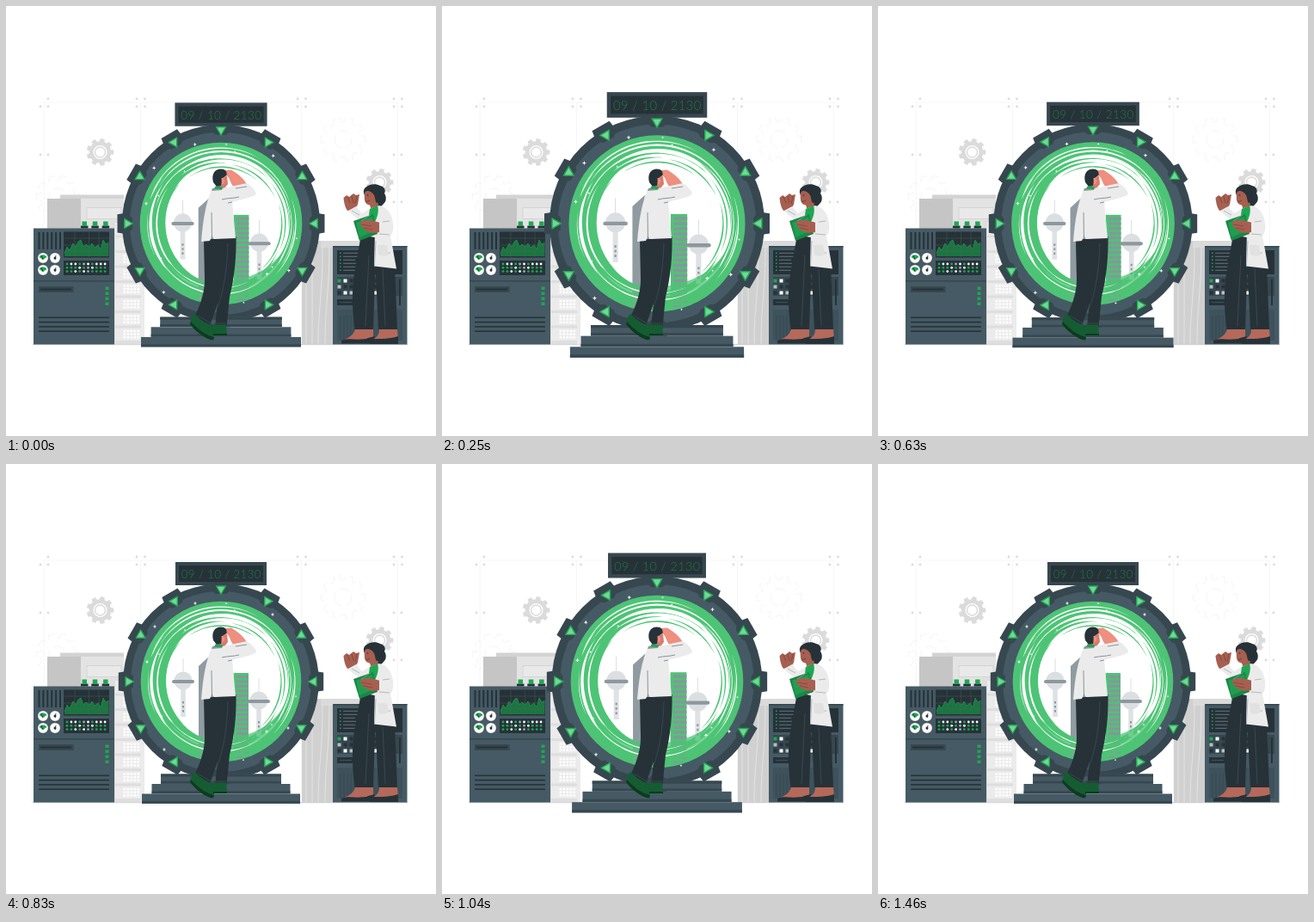
Write an HTML page that moves like this. It is 500 px wide and 500 px high and loops after 1.5 s.

```html
<!DOCTYPE html>
<html lang="en">
<head>
<meta charset="utf-8">
<title>Time portal</title>
<style>
html, body { margin: 0; width: 100%; height: 100%; overflow: hidden; background: #fff; }
svg { display: block; width: 100vw; height: 100vh; }
</style>
</head>
<body>
<svg id="stage" viewBox="0 0 500 500" xmlns="http://www.w3.org/2000/svg"></svg>
<script>
const INK = '#263238', SLATE = '#37474f', STEEL = '#455a64', GREEN = '#4dc475', LEAF = '#1fa653', PINE = '#155c33',
  COAT = '#ebebeb', SKIN = '#a65f50', PINK = '#ee8f80';

const rect = (x, y, w, h, fill, more = '') => `<rect x="${x}" y="${y}" width="${w}" height="${h}" fill="${fill}" ${more}/>`;
const circle = (x, y, r, fill, more = '') => `<circle cx="${x}" cy="${y}" r="${r}" fill="${fill}" ${more}/>`;
const path = (d, fill, more = '') => `<path d="${d}" fill="${fill}" ${more}/>`;
const line = (d, color, w = 1, more = '') => path(d, 'none', `stroke="${color}" stroke-width="${w}" ${more}`);
const rep = (n, f) => Array.from({ length: n }, (_, i) => f(i)).join('');

let seed = 11;
const rnd = () => (seed = seed * 16807 % 2147483647) / 2147483647;

const CX = 250, CY = 253;
const polar = (r, deg, x = CX, y = CY) => {
  const a = deg * Math.PI / 180;
  return (x + r * Math.cos(a)).toFixed(1) + ',' + (y + r * Math.sin(a)).toFixed(1);
};

// Tapered brush mark around the portal centre
function brush(r, from, to, w, fill, more) {
  const out = [], back = [];
  for (let i = 0; i <= 24; i++) {
    const k = i / 24, a = from + (to - from) * k, h = w / 2 * Math.sin(Math.PI * k);
    out.push(polar(r + h, a));
    back.unshift(polar(r - h, a));
  }
  return path('M' + out.concat(back).join('L') + 'Z', fill, more);
}

function gear(x, y, r, teeth, hole, fill, more) {
  const pts = [], step = 360 / teeth;
  for (let i = 0; i < teeth; i++) {
    [[-.32, .8], [-.22, 1], [.22, 1], [.32, .8]].forEach(([o, k]) => pts.push(polar(r * k, (i + o) * step, x, y)));
  }
  const ring = `M${x - hole},${y}a${hole},${hole} 0 1 0 ${2 * hole},0a${hole},${hole} 0 1 0 ${-2 * hole},0Z`;
  return path('M' + pts.join('L') + 'Z' + ring, fill, 'fill-rule="evenodd" ' + (more || ''));
}

const solidGear = (x, y) => gear(x, y, 16, 9, 8, '#dbdbdb') + circle(x, y, 6, '#fff', 'stroke="#dbdbdb" stroke-width="1.5"');

function wall() {
  const dots = [[40, 117], [49, 108], [49, 117], [40, 173], [49, 173], [451, 173], [460, 173], [451, 228], [460, 228]];
  [152, 339, 451].forEach(x => [108, 117].forEach(y => dots.push([x, y], [x + 9.5, y])));
  const faint = 'stroke="#f1f1f1" stroke-width=".8" stroke-dasharray="14 5"';
  return line('M44 112H456M44 112V393M156.5 112V393M343.5 112V393M455.5 112V393', '#f4f4f4', .8)
    + dots.map(([x, y]) => circle(x, y, 1.4, '#dcdcdc')).join('')
    + solidGear(109.5, 170)
    + gear(392, 155, 26, 10, 10, 'none', faint)
    + gear(60, 222, 25, 10, 10, 'none', faint)
    + solidGear(434.5, 205);
}

function leftRack() {
  let s = rect(63, 219.5, 74, 30, '#d3d3d3') + rect(48, 224, 40, 40, '#c5c5c5') + rect(87, 224, 50, 40, '#e3e3e3')
    + rect(94, 234.5, 40, 13, '#e9e9e9', 'stroke="#cfcfcf" stroke-width=".8"')
    + rect(121, 249, 40, 144.5, '#dedede') + rect(157, 249, 4, 144.5, '#ebebeb');
  s += rep(8, p => {
    const y = 252 + p * 17.5;
    return rect(127, y, 31, 14.5, '#ebebeb') + rep(15, i =>
      rect(136.5 + i % 5 * 4, y + 2.2 + Math.floor(i / 5) * 3.7, 2.7, 2.5, '#fff'));
  });
  return s;
}

function leftConsole() {
  const graph = 'M68 288L71 280L74 284L78 276L81 280L84 274L87 272L90 280L93 277L97 280L100 276L103 281L107 278L110 283L113 272L116 277L119.5 275';
  let s = rect(32, 258.5, 94, 135, STEEL) + rect(32, 319, 94, 1.6, SLATE);
  s += rep(3, i => rect(87 + i * 12.3, 255.5, 8.5, 3, INK) + rect(88.5 + i * 12.3, 250.5, 5.5, 5.5, LEAF));
  s += rep(6, i => rect(37.5 + i * 4.9, 263, 2, 20, INK));
  s += rect(67, 262.5, 53, 30, INK) + path(graph + 'V291H68Z', '#1c7541') + line(graph, LEAF, .6)
    + line('M67 270H120M67 278H120M67 285H120M80 263V292M96.5 263V292M108 263V292', '#4a665d', .4);
  [[43, 293], [57, 293], [43, 307], [57, 307]].forEach(([x, y], i) => {
    s += circle(x, y, 6.2, '#fff', `stroke="${INK}" stroke-width=".5"`)
      + (i % 2 ? circle(x, y, 1.5, INK) : path(`M${x - 4.5} ${y - 1}A5 5 0 0 1 ${x + 4.5} ${y - 1}L${x} ${y + 2}Z`, LEAF))
      + line(`M${x} ${y + 2}l${i % 2 ? 1 : -2} -5`, INK, .9);
  });
  s += rect(67, 296, 53, 17, INK) + rep(30, i => {
    const c = [LEAF, '#fff', LEAF, '#9fb0b5'][Math.floor(rnd() * 4)];
    return circle(71 + i % 10 * 4.9, 300 + Math.floor(i / 10) * 4.3, 1.4, c);
  });
  s += rect(38, 326, 40.5, 7, SLATE) + rect(40, 328.5, 36, 2, INK)
    + rep(4, i => rect(115.5, 326.5 + i * 6, 4, 3.5, LEAF))
    + rep(4, i => rect(38, 361.5 + i * 5.3, 82, 1.6, INK));
  return s;
}

function rightConsole() {
  let s = rect(344, 278, 38, 115.5, '#cfcfcf') + rect(364, 273, 50, 8, '#dadada') + rect(344, 273, 22, 120.5, '#d0d0d0')
    + line('M349 393V282M356 393V280M363 393C363 350 368 340 368 280M371 393C371 350 376 330 376 280', '#e4e4e4', 1)
    + rect(380, 279, 86.5, 114.5, STEEL) + rect(380, 279, 86.5, 1.5, SLATE)
    + rect(385, 284, 76, 28, INK);
  s += rep(6, i => rect(388, 286.5 + i * 4, 1.5, 1.5, LEAF)
    + line(`M392 ${287.3 + i * 4}h${[18, 22, 14, 20, 16, 21][i]}`, '#72848a', .8));
  s += rect(385, 315, 76, 22, SLATE);
  s += rep(30, i => rect(385.5 + i % 10 * 7, 317.5 + Math.floor(i / 10) * 7, 4, 4, [LEAF, '#fff', INK, '#b4c0c4', INK][Math.floor(rnd() * 5)]));
  s += rect(385, 341, 20, 7, INK) + line('M388 344.5H402', STEEL, .8)
    + rect(457, 318, 2, 30, INK) + rect(385, 353, 76, 36, '#3e525c')
    + rep(5, i => line(`M${389 + i * 4} 360V388`, SLATE, .8));
  return s;
}

function tower(x, y) {
  return line(`M${x} ${y - 22}V${y}`, '#d2d7d9', .8)
    + rect(x - 2.8, y + 12, 5.6, 34, '#dfe2e4')
    + circle(x, y + 4, 10.5, '#dcdfe1')
    + rect(x - 13, y + 3, 26, 4, '#8d989e', 'rx="2"')
    + rep(3, i => rect(x - 1, y + 28 + i * 5, 2, 2.5, '#8d989e'));
}

function city() {
  return '<g clip-path="url(#hole)">' + tower(206, 248) + tower(294, 271)
    + path('M224 235L237 223V340H224Z', '#8f9ba1') + rect(237, 223, 5, 118, '#b6bfc3')
    + rect(264.5, 243, 17.5, 103, GREEN)
    + rep(18, i => rect(267.5, 246 + i * 5.5, 14.5, 3, '#87969b')) + '</g>';
}

function vortex() {
  let s = circle(CX, CY, 93.3, GREEN) + '<ellipse cx="254.5" cy="252" rx="68.5" ry="72" fill="#fff"/>';
  const white = [[87, 205, 300, 1.5], [83, 210, 330, 2], [77, 225, 345, 4.5], [72, 230, 380, 5], [81, 125, 215, 3.5],
    [74, 120, 215, 2], [86, -20, 45, 1.3], [80, 5, 90, 2], [75, -50, 45, 8], [77, 70, 140, 1.8]];
  const green = [[66, 130, 225, 3], [70, 205, 275, 2.5], [65, 235, 310, 1.5], [74, -40, 25, 1.5], [70, -20, 50, 1.6],
    [78, -55, 5, 1.2], [69, 280, 335, 1.4]];
  s += white.map(b => brush(...b, '#fff')).join('') + green.map(b => brush(...b, GREEN)).join('');
  s += rep(12, () => {
    const a = rnd() * 360;
    return brush(74 + rnd() * 13, a, a + 18 + rnd() * 35, .5 + rnd() * .7, '#fff');
  });
  s += city() + brush(78, 25, 155, 23, GREEN, 'opacity=".75"') + brush(81, 55, 150, 1.4, '#fff') + brush(74, 65, 140, 1.2, '#fff');
  const stars = [220, 162, 256, 162, 173, 189, 208, 193, 164, 230, 178, 221, 170, 267, 181, 293, 184, 332, 276, 344,
    303, 311, 309, 303, 328, 307, 337, 270, 310, 175, 266, 170];
  for (let i = 0; i < stars.length; i += 2) {
    const r = i % 4 ? 1.5 : 2.4, q = r * .25;
    s += path(`M${stars[i]} ${stars[i + 1] - r}l${q} ${r - q}l${r - q} ${q}l${q - r} ${q}l${-q} ${r - q}l${-q} ${q - r}l${q - r} ${-q}l${r - q} ${-q}Z`, '#fff');
  }
  return s;
}

const around = shape => rep(12, i => `<g transform="rotate(${i * 30} ${CX} ${CY})">${shape}</g>`);

function portal() {
  let s = around(path('M239.5 133.8H260.5L263 150H237Z', SLATE));
  s += circle(CX, CY, 113.8, SLATE) + circle(CX, CY, 105, STEEL) + vortex();
  s += around(path('M243 139H257L262 146L256 151H244L238 146Z', SLATE)
    + path('M244.5 142H255.5L250 151.5Z', '#72d794', `stroke="${LEAF}" stroke-width="1.3" stroke-linejoin="round"`));
  [[180, 360.5, 140], [169.5, 372, 161], [158, 383.5, 184]].forEach(([x, y, w]) => {
    s += rect(x, y, w, 11.3, STEEL) + rect(x, y + 8.3, w, 3, SLATE);
  });
  s += rect(180, 360.5, 140, 3, SLATE);
  s += rect(197, 114, 106, 27, SLATE) + rect(201, 118, 98, 19, INK)
    + '<text x="250.3" y="133" text-anchor="middle" font-family="Lato, sans-serif" font-weight="300" font-size="13.4" letter-spacing=".35" fill="#1f7a45">09 / 10 / 2130</text>';
  return s;
}

function man() {
  return path('M230 272L267.5 268C268 290 266 315 260 338L256.5 373H243L246 346L237 372L219.5 361C228 343 231 330 231 318Z', INK)
    + line('M258 276C257 310 252 335 246 350M223 360L238 369M244 369H256', '#43555e', .6)
    + path('M220 358C224 364 233 370 242 372C244 376 243 382 241 387C234 387 222 377 214.5 369C214 365 217 359 220 358Z', PINE)
    + path('M215 367C223 376 232 383 242 385L241 388.500C232 388 220 378 214 370Z', '#0c3b20')
    + path('M242 370.5H256L257 382H241C241 378 241 374 242 370.5Z', PINE) + rect(241, 381, 16, 2, '#0c3b20')
    + path('M246 199L257 198L258 207L252 215H243Z', '#d97a6b')
    + path('M255 191L262 190.5C268 194 275 199 280 207L264 209.500C260 205 261 200 256 197Z', PINK)
    + path('M241 205C238.5 195 243 189.5 250 189.500C255 189.5 257.5 193 256.5 197L251.5 200L250 209L245 210Z', INK)
    + path('M250.500 200C255 199 256 205 251 208Z', PINK)
    + path('M239.5 213C246 211 252 212 257 211L280 206C285 209 290 214 291 218C290 222 280 223 263 228L267 270L242 271L239.500 267L237 273L227 274C229 250 232 229 239.5 213Z', COAT)
    + path('M240 212L253 210L251 214L239 215Z', '#8b989d')
    + path('M244 209L253 211L250 213L242 212.500Z', LEAF)
    + line('M251 225C259 223 263 224 271 222M267 212L280 210M239 240L239.5 271M258 229L263 228', '#5f6e75', .7);
}

function woman() {
  return path('M413 266L434 270L452 300L455 376H433L429.500 303L427 376H405.500C402 350 402 325 406 305Z', INK)
    + line('M422 290L418 372M438 306L441 372', '#465960', .6)
    + path('M406 376H427V386L430 391H391C391 386 402 388 406 376Z', '#b5695a')
    + path('M390 389C400 385 408 390 421 386L429 384V392.500H390Z', INK) + path('M398 387C406 384 410 388 420 387L416 380H406Z', '#b5695a')
    + path('M434 376H455L456 387H427C432 385 434 381 434 376Z', '#b5695a')
    + path('M423 389C431 385 441 389 456 384V393H423Z', INK)
    + path('M417 212C421 207 430 206 435 209C440 210 442 214 440 218C443 222 442 228 439 230C436 235 430 234 427 231C420 226 413 218 417 212Z', INK)
    + path('M417.500 216C422 213 430 214 432 221L433 235L424 238C424 234 424 231 421 231C416.500 230 416 222 417.500 216Z', SKIN)
    + path('M416.500 214C421 208 431 209 435 218C437 223 435 229 431 229C428 226 431 219 423 215.500Z', INK)
    + circle(420.500, 220, .8, INK) + line('M418.500 227Q421 228 423 226', '#64342c', .8)
    + path('M392.500 223L396 220L399 222L404 218L407 220L411 219L409 231L405 237L397 238C394 234 393 228 392.500 223Z', SKIN)
    + line('M397 222L400 229M402 221L404 229M408 221L406 230', '#78412f', .7)
    + path('M398 238L407 233L414 241L424 235L428 248L414 250C407 247 402 243 398 238Z', COAT)
    + path('M422 236L434 232C443 234 448 240 450 252C451 258 450 264 447 267L454 305.500L428 302.500L429 262Z', COAT)
    + path('M423 236L432 232C434 238 432 245 429 251L421 250Z', LEAF)
    + path('M404 250L427 242L432 265L411 273Z', '#198845') + path('M407 252L426 245L429 261L411 269Z', '#219d52')
    + path('M411 252C416 248 423 249 428 250L435 252V263L425 264C419 262 414 259 411 252Z', SKIN)
    + line('M413 254L425 256M416 258L426 260', '#78412f', .6)
    + path('M434 250L442 249L449 262C446 267 440 267 434 265Z', COAT)
    + line('M438 251L446 250M434 265L446 266M430 273L428.500 302M435 288L447 287M402 238L411 243M413 250L424 243', '#98a4a8', .7)
    + path('M432 278H443L445 289C439 292 436 291 433 289Z', '#e1e1e1');
}

const stage = document.getElementById('stage');
stage.innerHTML = `<defs><clipPath id="hole"><circle cx="${CX}" cy="${CY}" r="91"/></clipPath></defs>`
  + wall() + line('M31 393.7H467', '#9aa5aa', .6) + leftRack() + leftConsole() + rightConsole()
  + `<g id="portal">${portal()}</g>` + man() + woman();

// Double pulse: time in ms and strength, 1 being ten percent larger
const LOOP = 1500;
const pulse = [[-35, 0], [0, .11], [250, .99], [285, 1], [460, .57], [700, 0], [830, 0], [1040, .75], [1110, 1], [1250, .5], [1390, 0], [1465, 0], [1500, .11]];
const gate = document.getElementById('portal');

function draw(ms) {
  const t = ms % LOOP;
  const i = pulse.findIndex(p => p[0] > t);
  const [t0, a] = pulse[i - 1], [t1, b] = pulse[i];
  const k = 1 + .1 * (a + (b - a) * (t - t0) / (t1 - t0));
  gate.setAttribute('transform', `translate(250 254) scale(${k.toFixed(4)}) translate(-250 -254)`);
}

let start;
function tick(now) {
  if (start === undefined) start = now;
  draw(Math.max(0, now - start));
  requestAnimationFrame(tick);
}
draw(0);
requestAnimationFrame(tick);
</script>
</body>
</html>
```
